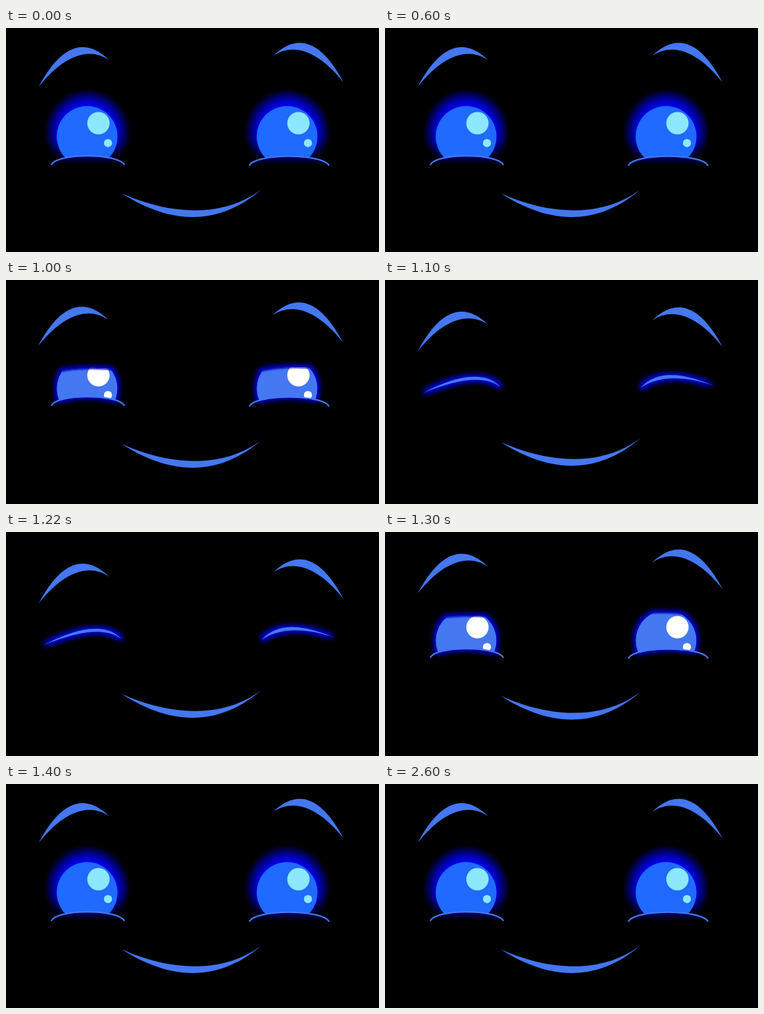
Write an HTML page that moves like this. It is 567 by 340 pixels and loops after 3.4 s.

```html
<!DOCTYPE html>
<html lang="en">
<head>
<meta charset="utf-8">
<title>Blinking face</title>
<style>
  html, body { margin: 0; width: 100%; height: 100%; overflow: hidden; background: #000; }
  svg { display: block; width: 100%; height: 100%; }
  .skin { fill: #4477f0; }
  .lid { fill: none; stroke: #4477f0; stroke-width: 2.2; }
  .neon { filter: url(#neon); }
  .soft { fill: none; stroke: #0000b4; stroke-width: 3; filter: blur(1.3px); }
</style>
</head>
<body>
<svg viewBox="0 0 567 340">
  <defs>
    <radialGradient id="halo">
      <stop offset=".58" stop-color="#0000f4"/>
      <stop offset=".72" stop-color="#0000c0"/>
      <stop offset=".88" stop-color="#000050"/>
      <stop offset="1" stop-color="#000"/>
    </radialGradient>
    <linearGradient id="fade" x2="0" y2="1">
      <stop offset="0" stop-color="#000" stop-opacity="0"/>
      <stop offset="1" stop-color="#000"/>
    </linearGradient>
    <linearGradient id="pouch" x2="0" y2="1">
      <stop offset="0" stop-color="#000068"/>
      <stop offset="1" stop-color="#000"/>
    </linearGradient>
    <filter id="neon" filterUnits="userSpaceOnUse" x="0" y="0" width="567" height="340"
            color-interpolation-filters="sRGB">
      <feMorphology in="SourceAlpha" operator="dilate" radius="4"/>
      <feGaussianBlur stdDeviation="3" result="shape"/>
      <feFlood flood-color="#0000c8"/>
      <feComposite in2="shape" operator="in"/>
      <feMerge><feMergeNode/><feMergeNode in="SourceGraphic"/></feMerge>
    </filter>
    <path id="brow" d="M50 89C76 40 112 5.5 157 49C128 29 90 39 50 89Z"/>
  </defs>
  <g id="brows" class="skin">
    <use href="#brow"/>
    <use href="#brow" transform="translate(563 -6.5) scale(-1 1)"/>
  </g>
  <path id="mouth" class="skin" d="M176 251C250 298 322 302 389 244.5C330 289 250 284 176 251Z"/>
  <g id="eyes"></g>
</svg>
<script>
const LOOP = 3400;
const byId = id => document.getElementById(id);

// dx: offset of the eyeball; lid: lower lid line, raised by a given amount
const leftEye = {
  dx: 0,
  lid: up => `M69 ${208 - up}C75 ${189.5 - up} 172 ${189.5 - up} 180 ${208 - up}`
};
const rightEye = {
  dx: 304,
  lid: up => `M370 ${209 - up}C377 ${190 - up} 483 ${190 - up} 491 ${209 - up}`
};

const ball = dx => `<circle cx="${123.3 + dx}" cy="164.7" r="46.2"/>`;

const iris = (dx, color, shine) => `
  <g fill="${color}">${ball(dx)}</g>
  <g fill="${shine}">
    <circle cx="${140.5 + dx}" cy="144.5" r="17"/>
    <circle cx="${155 + dx}" cy="174.7" r="6.2"/>
  </g>`;

const wideEye = ({ dx, lid }) => `
  <circle cx="${123.7 + dx}" cy="158" r="66" fill="url(#halo)"/>
  <rect x="${55 + dx}" y="172" width="140" height="36" fill="url(#fade)"/>
  <rect x="${55 + dx}" y="207.5" width="140" height="20"/>
  ${iris(dx, '#1f6aff', '#8ce8ff')}
  <path d="${lid(0)}V214H${69 + dx}Z"/>
  <path d="${lid(0)}Z" fill="url(#pouch)"/>
  <path class="lid" d="${lid(0)}"/>`;

// top: upper lid edge, from right to left across the iris
const narrowEye = ({ dx, lid }, top, name) => `
  <clipPath id="${name}Gap"><path d="${lid(17)}L${top}Z"/></clipPath>
  <clipPath id="${name}Ball">${ball(dx)}</clipPath>
  <g class="neon"><g clip-path="url(#${name}Gap)"><g clip-path="url(#${name}Ball)">
    ${iris(dx, '#4477f0', '#fff')}
    <path class="soft" d="M${top}"/>
  </g></g></g>
  <path class="lid" d="${lid(17)}"/>`;

const shutEyes = `<g class="skin neon">
  <path d="M58 171.5C95 151 150 132 176 163C152 143.5 110 150.5 58 171.5Z"/>
  <path d="M388.5 164C415 133 460 144 500 160.5C462 147.5 418 142.5 388.5 164Z"/>
</g>`;

const open = { brows: [0, 0], mouth: 0, eyes: wideEye(leftEye) + wideEye(rightEye) };
const closing = {
  brows: [-1.3, 11.3], mouth: -2,
  eyes: narrowEye(leftEye, '175 137Q122 129 72 140', 'closeL') +
        narrowEye(rightEye, '479 135Q428 127 376 140', 'closeR')
};
const shut = { brows: [0, 19], mouth: -5, eyes: shutEyes };
const opening = {
  brows: [0, 3.8], mouth: -2.2,
  eyes: narrowEye(leftEye, '175 129Q124 124 72 131', 'openL') +
        narrowEye(rightEye, '479 126Q425 119 376 124', 'openR')
};

const poseAt = t =>
  t < 1000 ? open : t < 1100 ? closing : t < 1300 ? shut : t < 1400 ? opening : open;

const start = performance.now();
let shown;

function draw() {
  const pose = poseAt((performance.now() - start) % LOOP);
  if (pose !== shown) {
    shown = pose;
    byId('brows').setAttribute('transform', `translate(${pose.brows})`);
    byId('mouth').setAttribute('transform', `translate(0 ${pose.mouth})`);
    byId('eyes').innerHTML = pose.eyes;
  }
  requestAnimationFrame(draw);
}
draw();
</script>
</body>
</html>
```
